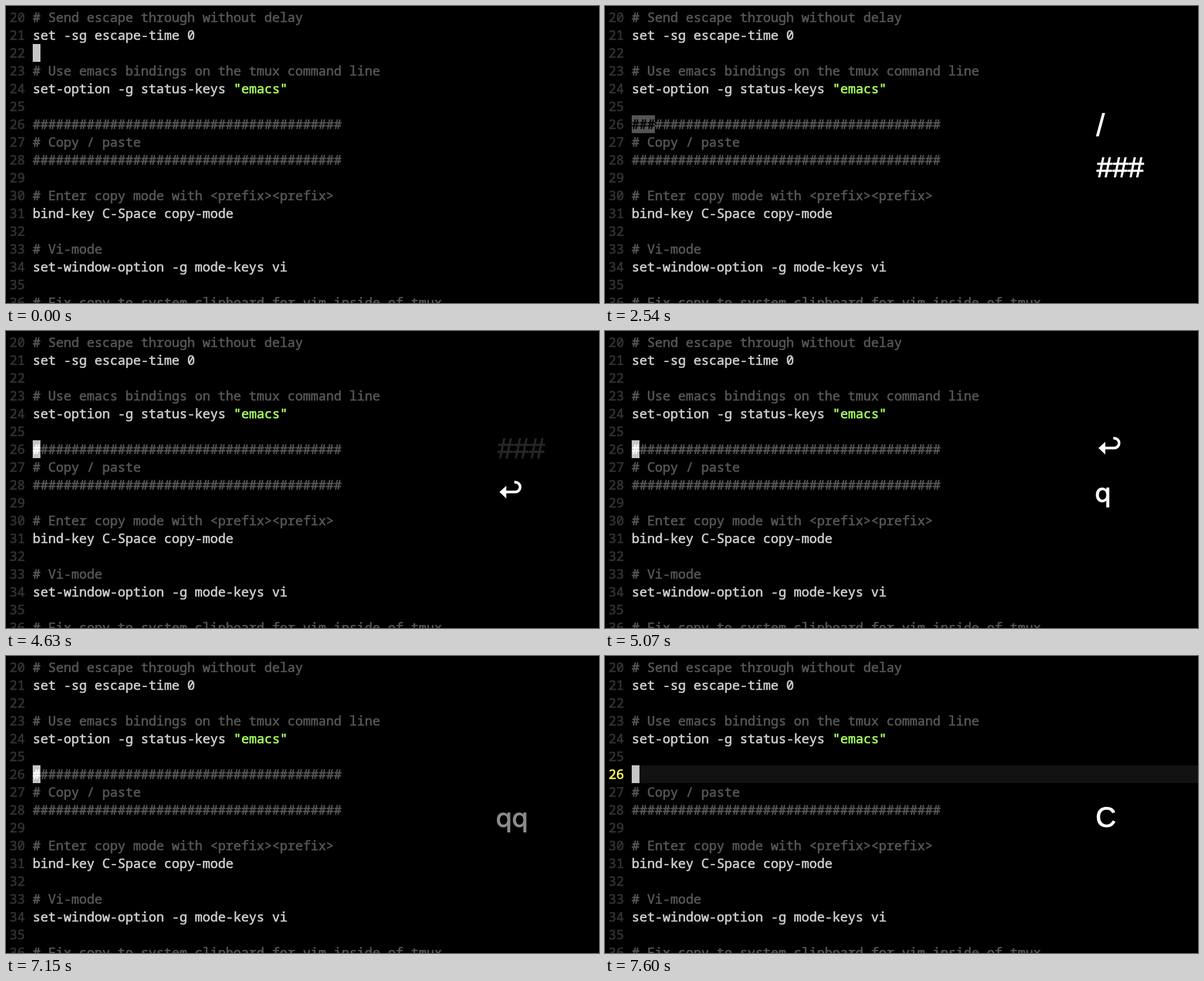
An HTML page with a canvas that plays this animation: 998x500 px, repeating every 8 s.

```html
<!DOCTYPE html>
<html lang="en">
<head>
<meta charset="utf-8">
<title>Vim search and macro</title>
<style>
  html, body { margin: 0; width: 100%; height: 100%; overflow: hidden; background: #000; }
  canvas { display: block; }
</style>
</head>
<body>
<canvas id="stage" width="998" height="500"></canvas>
<script>
const ctx = document.getElementById('stage').getContext('2d');
const LOOP = 8000;
const CELL = 13, ROW = 30, TOP = 4, GUTTER = 6, LEFT = 45, FIRST = 20;
const CODE_FONT = '21.667px "Noto Sans Mono", "DejaVu Sans Mono", monospace';
const KEY_FONT = '44px Inter, sans-serif';
const WIDE_KEY_FONT = '47.6px "Liberation Sans", Arial, sans-serif';
const COMMENT = '#555', PLAIN = '#ccc', STRING = '#a8ff60', NUMBER = '#333';
const CURSOR = '#c6c6c6';
const RULE = '#'.repeat(40);

const lines = [
  '# Send escape through without delay',
  'set -sg escape-time 0',
  '',
  '# Use emacs bindings on the tmux command line',
  'set-option -g status-keys "emacs"',
  '',
  RULE,
  '# Copy / paste',
  RULE,
  '',
  '# Enter copy mode with <prefix><prefix>',
  'bind-key C-Space copy-mode',
  '',
  '# Vi-mode',
  'set-window-option -g mode-keys vi',
  '',
  '# Fix copy to system clipboard for vim inside of tmux'
];

// Keystroke overlay: typed = time of each character, raised = times it moves up a slot,
// fade = [time, brightness] steps.
const keys = [
  { text: '/', x: 826, font: KEY_FONT, typed: [1500], raised: [2240, 3430],
    fade: [[3580, .15], [3730, 0]] },
  { text: '###', x: 827.5, font: WIDE_KEY_FONT, typed: [2240, 2390, 2540], raised: [3430],
    fade: [[4630, .15], [4770, 0]] },
  { draw: drawReturn, typed: [3430], raised: [5070],
    fade: [[5510, .15], [5660, 0]] },
  { text: 'qq', x: 824.5, font: KEY_FONT, typed: [5070, 5210], raised: [],
    fade: [[7150, .55], [7300, .15], [7450, 0]] },
  { text: 'C', x: 825.8, font: WIDE_KEY_FONT, typed: [7600], raised: [], fade: [] }
];

const countPast = (times, t) => times.filter(time => t >= time).length;
const rowTop = number => TOP + (number - FIRST) * ROW;

// Text with a thin outline in its own colour, for slightly heavier strokes.
function heavyText(text, x, y, color, outline) {
  ctx.fillStyle = ctx.strokeStyle = color;
  ctx.lineWidth = outline;
  ctx.lineJoin = 'round';
  ctx.fillText(text, x, y);
  ctx.strokeText(text, x, y);
}

function write(text, x, number, color) {
  heavyText(text, x, rowTop(number) + 22.5, color, .7);
}

function block(number, cells, color) {
  ctx.fillStyle = color;
  ctx.fillRect(LEFT, rowTop(number), cells * CELL, ROW);
}

function drawLine(text, number) {
  const quote = text.indexOf('"');
  if (quote < 0) {
    write(text, LEFT, number, text[0] === '#' ? COMMENT : PLAIN);
  } else {
    write(text.slice(0, quote), LEFT, number, PLAIN);
    write(text.slice(quote), LEFT + quote * CELL, number, STRING);
  }
}

// Paints a block over the start of a line and rewrites the characters on it.
function mark(number, cells, background, color) {
  block(number, cells, background);
  write(lines[number - FIRST].slice(0, cells), LEFT, number, color);
}

function drawEditor(t) {
  const changing = t >= 7600;
  ctx.font = CODE_FONT;
  if (changing) block(26, (998 - LEFT) / CELL, '#121212');
  lines.forEach((text, i) => {
    const number = FIRST + i, active = changing && number === 26;
    write(String(number), GUTTER, number, active ? '#ffff60' : NUMBER);
    if (!active) drawLine(text, number);
  });

  if (t < 1500) block(22, 1, CURSOR);
  else if (t < 2240) return;
  else if (t < 2390) mark(23, 1, COMMENT, '#000');
  else if (t < 3580) mark(26, t < 2540 ? 2 : 3, COMMENT, '#000');
  else if (changing) block(26, 1, CURSOR);
  else mark(26, 1, CURSOR, '#fff');
}

function drawReturn(color) {
  ctx.fillStyle = ctx.strokeStyle = color;
  ctx.lineWidth = 4.5;
  ctx.beginPath();
  ctx.moveTo(840, 271);
  ctx.lineTo(857, 271);
  ctx.arc(857, 262.75, 8.25, Math.PI / 2, -Math.PI / 2, true);
  ctx.lineTo(855.5, 254.5);
  ctx.stroke();
  ctx.beginPath();
  ctx.moveTo(830.5, 271);
  ctx.lineTo(842, 260.5);
  ctx.lineTo(842, 282);
  ctx.fill();
}

function drawKey(key, t) {
  const count = countPast(key.typed, t);
  const faded = countPast(key.fade.map(step => step[0]), t);
  const brightness = faded ? key.fade[faded - 1][1] : 1;
  if (!count || !brightness) return;
  const color = `hsl(0 0% ${brightness * 100}%)`;
  ctx.save();
  ctx.translate(0, -74 * countPast(key.raised, t));
  if (key.draw) key.draw(color);
  else {
    ctx.font = key.font;
    heavyText(key.text.slice(0, count), key.x, 288, color, 1.2);
  }
  ctx.restore();
}

function render(now) {
  const t = now % LOOP;
  ctx.fillStyle = '#000';
  ctx.fillRect(0, 0, 998, 500);
  drawEditor(t);
  keys.forEach(key => drawKey(key, t));
}

const start = performance.now();
function tick() {
  render(performance.now() - start);
  requestAnimationFrame(tick);
}
tick();
</script>
</body>
</html>
```
